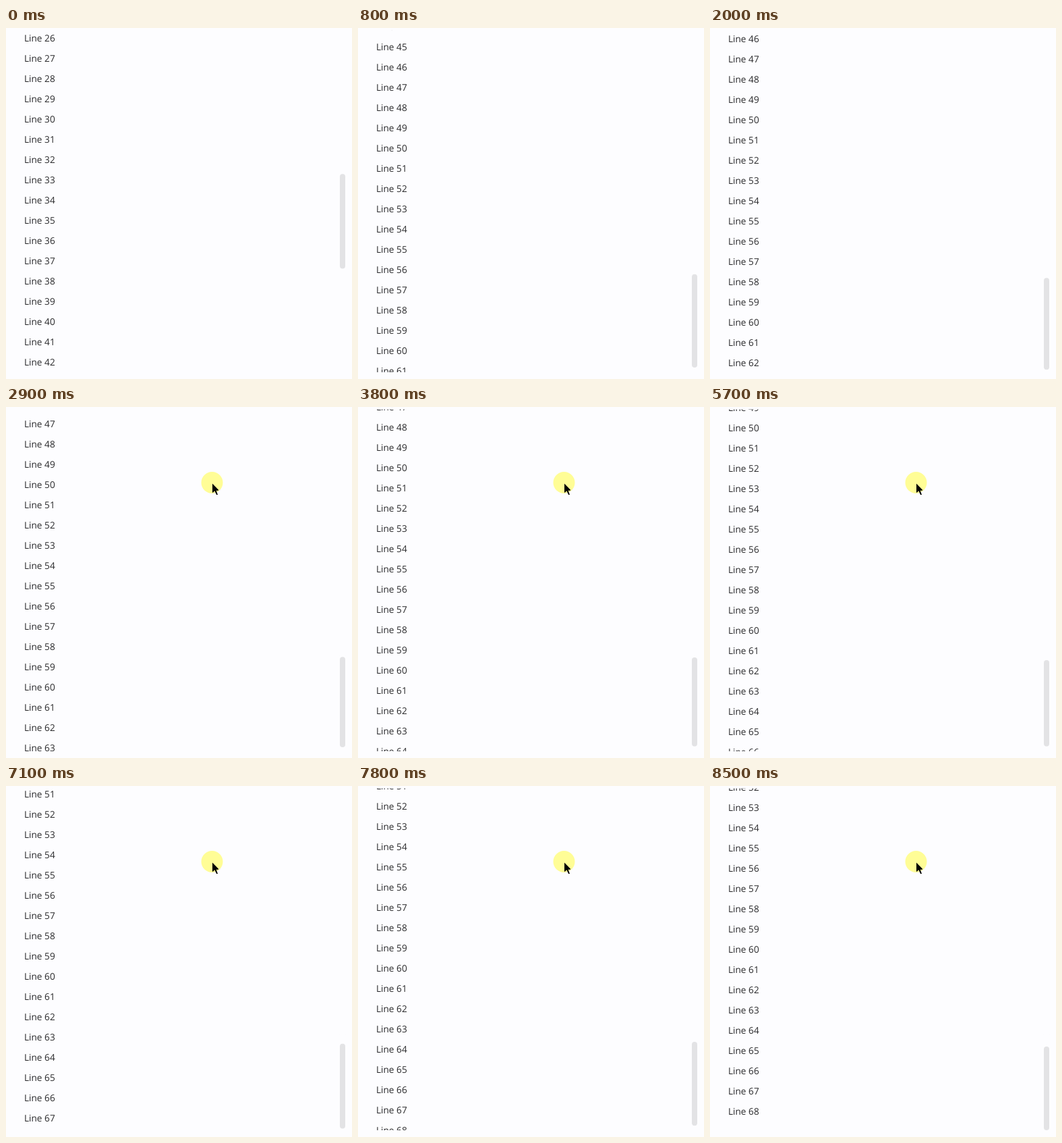
Recreate the animation shown at these times as an HTML page. Size 513 by 520 pixels, loop 8600 ms.

```html
<!DOCTYPE html>
<html lang="en">
<head>
<meta charset="utf-8">
<title>Growing list</title>
<style>
  html, body { margin: 0; width: 100%; height: 100%; overflow: hidden; background: #fdfdff; }
  svg { display: block; width: 513px; height: 520px; }
  text { font: 13.7px "Open Sans", "Noto Sans", sans-serif; fill: #2a2a2c; text-rendering: geometricPrecision; }
</style>
</head>
<body>
<svg viewBox="0 0 513 520" xmlns="http://www.w3.org/2000/svg">
  <clipPath id="view"><rect y="3.5" width="513" height="506.5"/></clipPath>
  <g id="list" clip-path="url(#view)"></g>
  <rect id="thumb" x="495" width="8" rx="4" fill="#e3e3e5"/>
  <g id="cursor">
    <circle cx="305.5" cy="112" r="16" fill="#fffd96"/>
    <path d="M306 113.5V126.8H306.8L309.4 124.2L312 130H314L311.7 123.7H315V122.7Z"/>
  </g>
</svg>
<script>
const LOOP = 8600, TICK = 100;
const ROW = 30, VIEW = 506, TOP = 4, PAD = 24;
const FIRST = 60, SLIDE = 950, CURSOR_AT = 2800;
// Moments when a line is appended and the list slides to its end.
const adds = [-371.3, 608, 1648, 2650, 3654, 4650, 5590, 6688, 7650];

const list = document.getElementById("list");
const thumb = document.getElementById("thumb");
const cursor = document.getElementById("cursor");
const rows = Array.from({ length: 19 }, () => {
  const row = document.createElementNS("http://www.w3.org/2000/svg", "text");
  row.setAttribute("x", 26.9);
  return list.appendChild(row);
});

// cubic-bezier(.42, 0, .2, 1)
function ease(x) {
  if (x <= 0) return 0;
  if (x >= 1) return 1;
  let lo = 0, hi = 1;
  for (let i = 0; i < 24; i++) {
    const u = (lo + hi) / 2, v = 1 - u;
    if (1.26 * u * v * v + 0.6 * u * u * v + u * u * u < x) lo = u;
    else hi = u;
  }
  return lo * lo * (3 - 2 * lo);
}

const height = count => count * ROW + PAD;

function draw(t) {
  const step = adds.filter(a => a <= t).length - 1;
  const count = FIRST + step;
  const end = height(count) - VIEW;
  const start = step ? end - ROW : 0;
  const scroll = Math.round(start + (end - start) * ease((t - adds[step]) / SLIDE));

  const first = Math.max(1, Math.floor(scroll / ROW));
  rows.forEach((row, i) => {
    const n = first + i;
    row.textContent = n <= count ? "Line " + n : "";
    row.setAttribute("y", n * ROW - scroll + 5);
  });

  const scale = VIEW / height(count);
  thumb.setAttribute("y", TOP + scroll * scale);
  thumb.setAttribute("height", VIEW * scale);
  cursor.style.display = t >= CURSOR_AT ? "" : "none";
}

const origin = performance.now();
function frame() {
  const t = (performance.now() - origin) % LOOP;
  draw(Math.floor(t / TICK) * TICK);
  requestAnimationFrame(frame);
}
draw(0);
requestAnimationFrame(frame);
</script>
</body>
</html>
```
